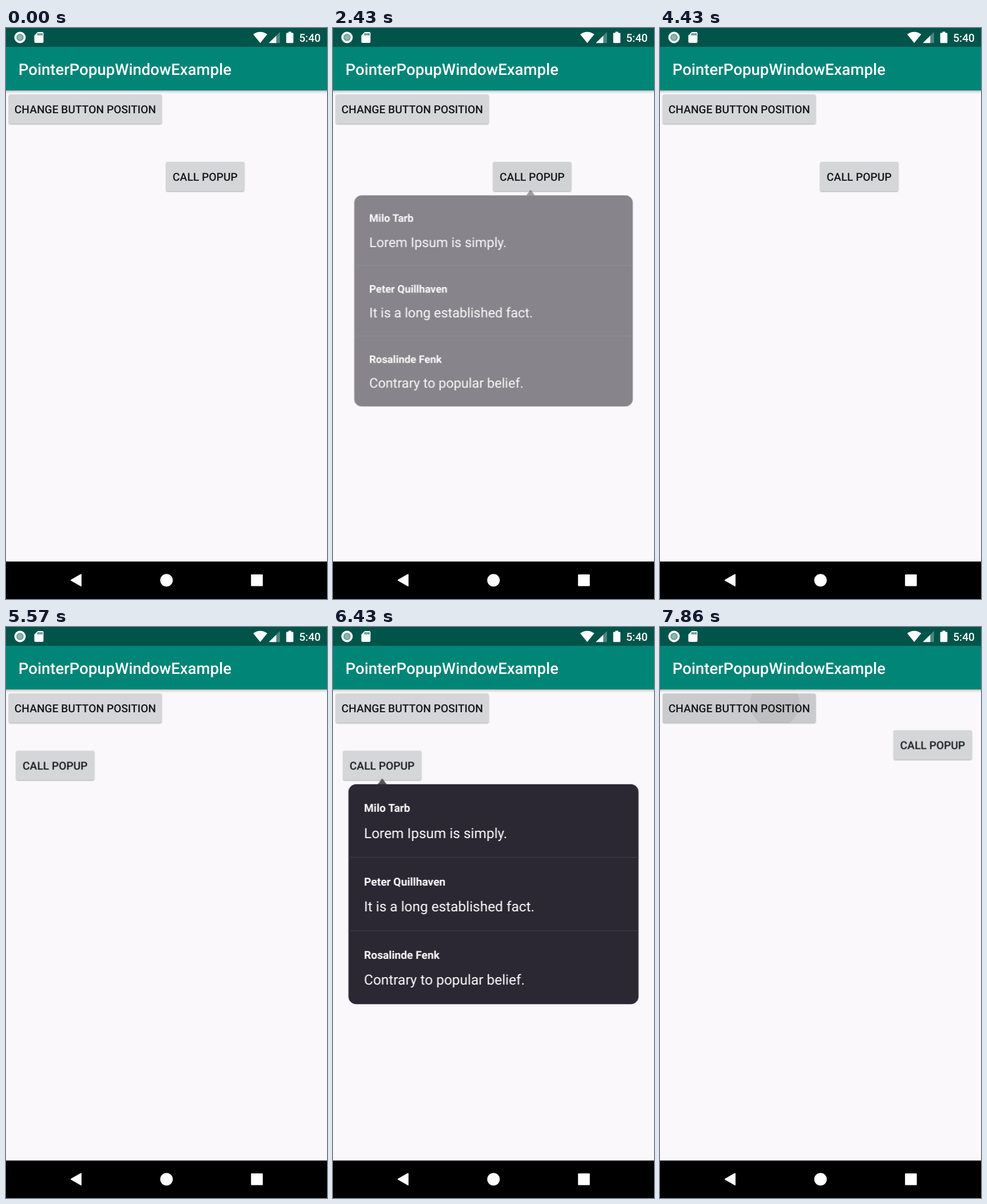
These frames come from a looping animation (561 px wide and 998 px high, 8000 ms). An HTML page:

```html
<!DOCTYPE html>
<html lang="en">
<head>
<meta charset="utf-8">
<title>Popup window demo</title>
<style>
  /* --px is one pixel of the 1080 px wide device screen; its text sizes are whole pixels. */
  :root { --px: calc(561px / 1080); }
  html, body { margin: 0; width: 100%; height: 100%; overflow: hidden; background: #faf8fb; }
  svg { display: block; width: 561px; height: 998px; }
  text { font-family: Roboto, sans-serif; font-size: calc(37 * var(--px)); text-rendering: geometricPrecision; }
  .medium { font-weight: 500; }
  .title { font-size: calc(53 * var(--px)); }
  .label { font-weight: 500; fill: #17161a; text-anchor: middle; }
  .face { fill: #d5d6d8; filter: drop-shadow(0 1px 1.3px rgba(0, 0, 0, .35)); }
  .name { font-weight: 700; fill: #fff; }
  .body { font-size: calc(47 * var(--px)); fill: #fff; }

  .timed { animation: 8s step-end infinite; }
  #call { animation-name: move; }
  #popup { animation-name: popup; }
  #arrow { animation-name: arrow; }
  #changeTint { animation-name: changeTint; }
  #changeRipple { animation-name: changeRipple; }
  #callTint { animation-name: callTint; }

  @keyframes move {
    0% { transform: translate(280px, 234px); }
    57.125% { transform: translate(17.7px, 216.3px); }
    98.25%, 100% { transform: translate(408.4px, 180.5px); }
  }
  /* Opacity runs 0 to 1 while the scale runs .9 to 1. */
  @keyframes popup {
    0% { opacity: 0; transform: translate(280.5px, 283px) scale(.9); }
    30.375% { opacity: .56; transform: translate(280.5px, 283px) scale(.96); }
    32.125% { opacity: 1; transform: translate(280.5px, 283px); }
    44.625% { opacity: .47; transform: translate(280.5px, 283px) scale(.945); }
    46.375% { opacity: 0; transform: translate(280.5px, 265px) scale(.9); }
    75% { opacity: .565; transform: translate(280.5px, 265px) scale(.96); }
    78.625% { opacity: 1; transform: translate(280.5px, 265px); }
    87.5% { opacity: .47; transform: translate(280.5px, 265px) scale(.945); }
    89.25%, 100% { opacity: 0; transform: translate(280.5px, 265px) scale(.9); }
  }
  @keyframes arrow {
    0% { transform: translateX(67.5px); }
    46.375%, 100% { transform: translateX(-194.5px); }
  }
  @keyframes changeTint {
    0% { opacity: 0; }
    57.125% { opacity: .05; }
    62.5% { opacity: 0; }
    98.25%, 100% { opacity: .05; }
  }
  @keyframes changeRipple {
    0% { opacity: 0; transform: scale(0); }
    57.125% { opacity: .06; transform: scale(43); }
    58.875% { opacity: .05; transform: scale(88); }
    62.5% { opacity: 0; transform: scale(0); }
    98.25%, 100% { opacity: .06; transform: scale(43); }
  }
  @keyframes callTint {
    0% { opacity: 0; }
    28.625% { opacity: .06; }
    30.375% { opacity: .015; }
    46.375% { opacity: 0; }
    73.25% { opacity: .06; }
    75% { opacity: .015; }
    78.625%, 100% { opacity: 0; }
  }
</style>
</head>
<body>
<svg viewBox="0 0 561 998">
  <defs>
    <linearGradient id="shade" x2="0" y2="1">
      <stop stop-color="#000" stop-opacity=".3"/>
      <stop offset=".4" stop-color="#000" stop-opacity=".1"/>
      <stop offset="1" stop-color="#000" stop-opacity="0"/>
    </linearGradient>
    <clipPath id="changeClip"><rect width="267" height="51" rx="2.5"/></clipPath>
  </defs>

  <rect width="561" height="998" fill="#faf8fb"/>
  <rect y="109" width="561" height="6" fill="url(#shade)"/>
  <rect y="32" width="561" height="77" fill="#008577"/>
  <rect width="561" height="33" fill="#00544a"/>
  <text class="medium title" x="21.8" y="81.6" fill="#fff">PointerPopupWindowExample</text>

  <g id="status" fill="#fff">
    <circle cx="24.5" cy="16.5" r="10"/>
    <circle cx="24.5" cy="16.5" r="6.2" fill="#5f948c"/>
    <circle cx="24.5" cy="16.5" r="4.7" fill="#8fb4ae"/>
    <path d="M55.5 7H63.5Q65.5 7 65.5 9V24Q65.5 26 63.5 26H51.5Q49.5 26 49.5 24V13Z"/>
    <path d="M56.2 9V13M59.4 9V13M62.6 9V13" stroke="#00544a" stroke-width="1.7"/>
    <path d="M432 11Q444.3 2.5 456.6 11L444.3 26.3Z"/>
    <path d="M459.3 26.3L478.8 7V26.3Z" opacity=".3"/>
    <path d="M459.3 26.3L472.3 13.4V26.3Z"/>
    <path d="M493.5 6.5H498.5V8.5H501Q502.3 8.5 502.3 9.8V25Q502.3 26.3 501 26.3H491Q489.7 26.3 489.7 25V9.8Q489.7 8.5 491 8.5H493.5Z"/>
    <text class="medium" x="512.2" y="23.8">5:40</text>
  </g>

  <g transform="translate(5 116.3)">
    <rect class="face" width="267" height="51" rx="2.5"/>
    <g clip-path="url(#changeClip)">
      <rect id="changeTint" class="timed" width="267" height="51"/>
      <g transform="translate(195.5 17)"><circle id="changeRipple" class="timed" r="1"/></g>
    </g>
    <text class="label" x="133.5" y="33">CHANGE BUTTON POSITION</text>
  </g>

  <g id="call" class="timed">
    <rect class="face" width="136.3" height="51" rx="2.5"/>
    <rect id="callTint" class="timed" width="136.3" height="51" rx="2.5"/>
    <text class="label" x="68.1" y="32.6">CALL POPUP</text>
  </g>

  <g id="popup" class="timed">
    <path id="arrow" class="timed" d="M-8 10.2L0 -.5L8 10.2Z" fill="#555"/>
    <rect x="-253.5" y="9.7" width="507" height="384.6" rx="13.6" fill="#2c2833"/>
    <path d="M-253.5 137.6H253.5M-253.5 265.9H253.5" stroke="#413e47"/>
    <g transform="translate(-226.2 0)">
      <text class="name" y="58.2">Milo Tarb</text>
      <text class="body" y="103.6">Lorem Ipsum is simply.</text>
      <text class="name" y="186.5">Peter Quillhaven</text>
      <text class="body" y="231.9">It is a long established fact.</text>
      <text class="name" y="314.8">Rosalinde Fenk</text>
      <text class="body" y="360.2">Contrary to popular belief.</text>
    </g>
  </g>

  <rect y="932.5" width="561" height="65.5"/>
  <g id="navigation" fill="#fff" stroke="#fff" stroke-linejoin="round" stroke-width="2">
    <path d="M114 965.2L131 955.4V975Z"/>
    <circle cx="280.5" cy="965.2" r="10"/>
    <rect x="429.2" y="956" width="18.6" height="18.6"/>
  </g>
</svg>
</body>
</html>
```
